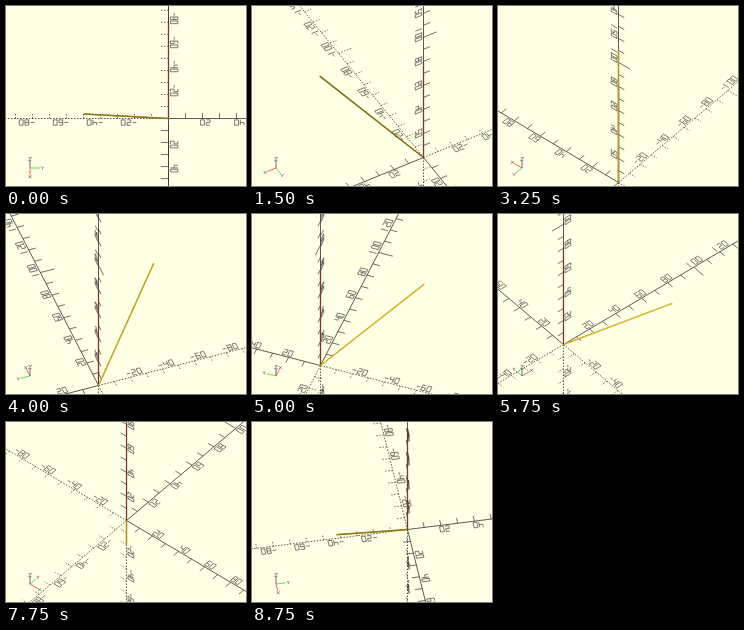
Recreate the animation shown at these times as an HTML page with a canvas. Size 240 by 180 pixels, loop 9000 ms.

```html
<!DOCTYPE html>
<html lang="en">
<head>
<meta charset="utf-8">
<title>Rotating axes</title>
<style>
  html, body { margin: 0; width: 100%; height: 100%; overflow: hidden; background: #ffffe5; }
  canvas { display: block; width: 240px; height: 180px; }
</style>
</head>
<body>
<canvas id="stage" width="240" height="180"></canvas>
<script>
const ctx = document.getElementById('stage').getContext('2d');
const RAD = Math.PI / 180;
const SCALE = 1.7, TILT = Math.SQRT1_2;   // camera looks down at 45 degrees
const LOOP = 9000, STEP = 250;
const REACH = 266;                        // axis length in units
const ROD = 79.3;
const TIP = [
  ROD * Math.sin(55 * RAD) * Math.cos(-50 * RAD),
  ROD * Math.sin(55 * RAD) * Math.sin(-50 * RAD),
  ROD * Math.cos(55 * RAD)
];
const INK = '#333', DOTS = [1.5, 1.5];

// Tick and digit sizes, in units
const TICK = REACH / 60;
const GAP = TICK / 4, DIGIT_W = TICK / 2, DIGIT_H = TICK, ADVANCE = DIGIT_W + GAP;

// Stroke digits on a 2 x 3 grid: 0 1 top, 2 3 middle, 4 5 bottom
const GLYPHS = {
  '0': ['01540'], '1': ['04'], '2': ['013245'], '4': ['023', '15'],
  '6': ['104532'], '8': ['01540', '23'], '-': ['23']
};

// dir: axis, read: text direction sign, side: axis towards the top of the digits
const AXES = [
  { dir: 0, read: 1, side: 1 },
  { dir: 1, read: -1, side: 0 },
  { dir: 2, read: -1, side: 0 }
];

let cos, sin, ox, oy;

function rotate([x, y, z]) {
  return [x * cos + y * sin, TILT * (y * cos - x * sin + z)];
}

function project(p) {
  const [u, v] = rotate(p);
  return [ox + SCALE * u, oy - SCALE * v];
}

function point(axis, along, aside) {
  const p = [0, 0, 0];
  p[axis.dir] = along;
  p[axis.side] = aside;
  return p;
}

// Strokes a set of polylines; dots is an optional dash pattern
function strokes(lines, color, width, dots = []) {
  ctx.beginPath();
  for (const points of lines) {
    points.forEach(([x, y], i) => i ? ctx.lineTo(x, y) : ctx.moveTo(x, y));
  }
  ctx.setLineDash(dots);
  ctx.strokeStyle = color;
  ctx.lineWidth = width;
  ctx.stroke();
}

function label(axis, sign, value) {
  let text = (sign < 0 ? '-' : '') + value;
  if (axis.read !== sign) text = [...text].reverse().join('');
  return [...text].flatMap((char, i) => {
    const center = sign * (value + i * ADVANCE);
    return GLYPHS[char].map(stroke => [...stroke].map(n => project(point(
      axis,
      center + axis.read * (n % 2 - 0.5) * DIGIT_W,
      GAP + (DIGIT_H) * (1 - (n >> 1) / 2)
    ))));
  });
}

function drawAxis(axis, sign) {
  const dots = sign < 0 ? DOTS : [];
  const ticks = [], labels = [];
  for (let i = 10; i < REACH; i += 10) {
    const size = i % 100 ? TICK : TICK * 2;
    ticks.push([project(point(axis, sign * i, 0)), project(point(axis, sign * i, -size))]);
    if (i % 20 === 0) labels.push(...label(axis, sign, i));
  }
  strokes([[project([0, 0, 0]), project(point(axis, sign * REACH, 0))]], INK, 0.8, dots);
  strokes(ticks, INK, 0.7, dots);
  strokes(labels, INK, 0.65);
}

function drawRods(turn) {
  const base = project([0, 0, 0]);
  strokes([[base, project([0, 0, ROD])]], '#7f3430', 1.3);

  // The tilted rod is brightest when it points right
  const light = 0.5 + 0.5 * Math.cos((-50 - turn) * RAD);
  const shade = (dark, bright) => Math.round(dark + (bright - dark) * light);
  const rod = [[base, project(TIP)]];
  strokes(rod, `rgb(${shade(112, 205)},${shade(94, 172)},${shade(8, 30)})`, 1.5);
  strokes(rod, `rgb(${shade(142, 236)},${shade(124, 204)},${shade(16, 44)})`, 0.6);
}

function drawCompass() {
  const letters = [
    [[[-1, -1], [1, 1]], [[1, -1], [-1, 1]]],
    [[[-1, -1], [0, 0], [1, -1]], [[0, 0], [0, 1]]],
    [[[-1, -1], [1, -1], [-1, 1], [1, 1]]]
  ];
  ['#f33', '#3d3', '#447'].forEach((color, i) => {
    const [u, v] = rotate([0, 1, 2].map(n => +(n === i)));
    const at = r => [24 + r * u, 162 - r * v];
    strokes([[at(0), at(10)]], color, 0.8);
    const [x, y] = at(12.5);
    strokes(letters[i].map(stroke => stroke.map(([a, b]) => [x + a * 1.5, y + b * 1.5])), '#444', 0.6);
  });
}

function draw(now) {
  const turn = 90 + 10 * Math.floor(now % LOOP / STEP);
  cos = Math.cos(turn * RAD);
  sin = Math.sin(turn * RAD);

  // Keep the middle of both rods in the centre of the stage, on whole pixels
  const [u, v] = rotate([TIP[0] / 2, TIP[1] / 2, ROD / 2]);
  const snap = n => Math.floor(n + 0.1) + 0.5;
  ox = snap(120 - SCALE * u);
  oy = snap(90 + SCALE * v);

  ctx.fillStyle = '#ffffe5';
  ctx.fillRect(0, 0, 240, 180);
  for (const axis of AXES) {
    drawAxis(axis, -1);
    drawAxis(axis, 1);
  }
  drawRods(turn);
  drawCompass();
}

function frame() {
  draw(performance.now());
  requestAnimationFrame(frame);
}
frame();
</script>
</body>
</html>
```
